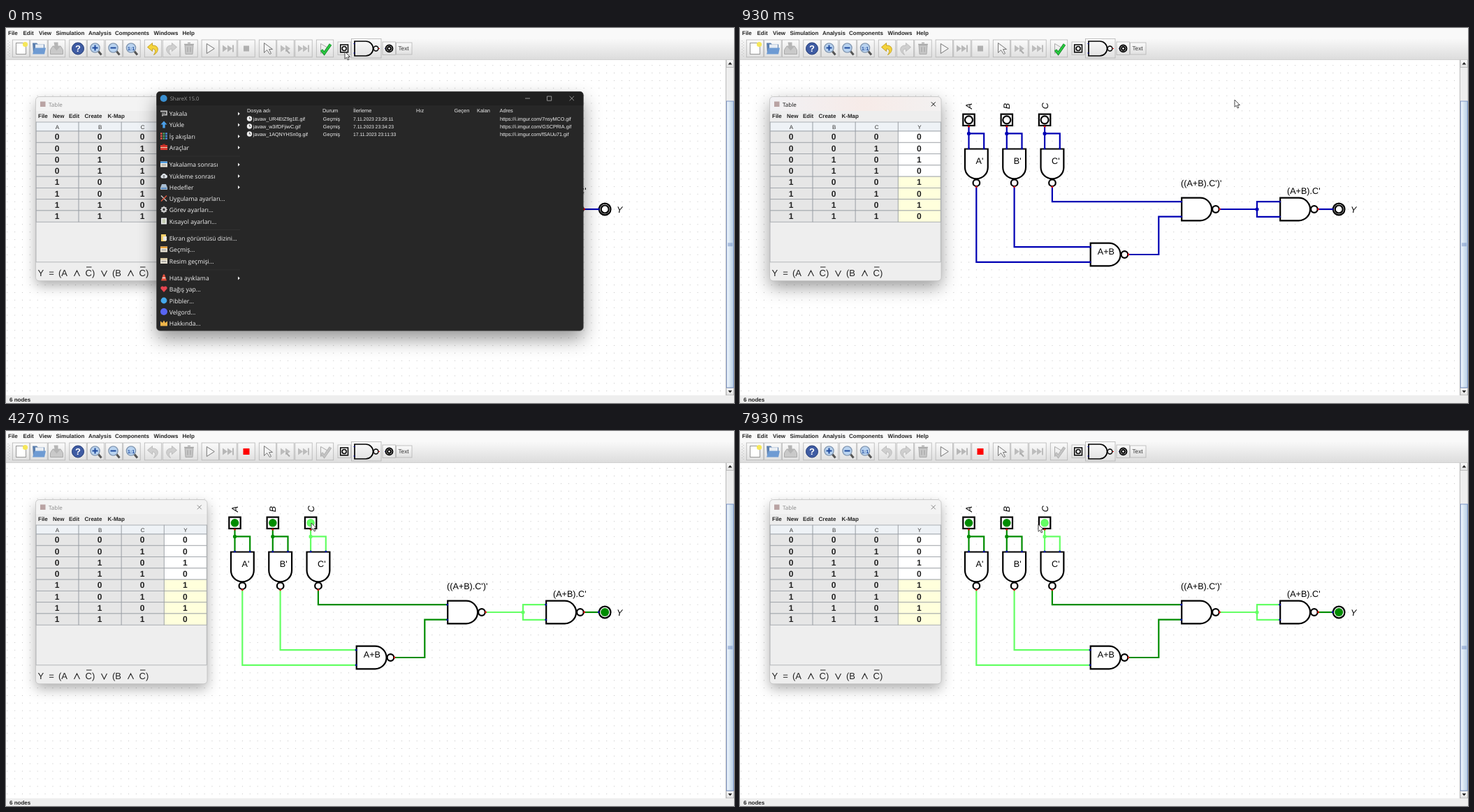
Recreate the animation shown at these times as an HTML page. Size 1042 by 538 pixels, loop 8000 ms.

```html
<!DOCTYPE html>
<html lang="en">
<head>
<meta charset="utf-8">
<title>Logic simulation</title>
<style>
html, body { margin: 0; width: 100%; height: 100%; overflow: hidden; background: #fff; }
svg { display: block; width: 1042px; height: 538px; text-rendering: geometricPrecision; font-family: "Liberation Sans", Arial, sans-serif; }
.ui { font-family: "Open Sans", "Noto Sans", sans-serif; }
.menu { font-size: 8px; font-weight: bold; fill: #222; }
.digit { font-size: 12px; font-weight: bold; text-anchor: middle; fill: #222; }
.head { font-size: 7.4px; fill: #eee; }
.row { font-size: 7.2px; fill: #f2f2f2; }
.date { font-size: 6.8px; fill: #f2f2f2; }
.label { font-size: 12.6px; }
.ink { fill: none; stroke: #000; stroke-width: 2.2; }
.wire { fill: none; stroke: currentColor; stroke-width: 2.2; }
.btn { fill: url(#face); stroke: #b4b4b4; stroke-width: .8; }
.run .idle, svg:not(.run) .live { display: none; }
.table { filter: drop-shadow(0 7px 9px rgba(0,0,0,.32)); }
.focus .table { filter: drop-shadow(0 9px 12px rgba(0,0,0,.4)); }
.caption { fill: #888; stroke: none; }
.focus .caption { fill: #111; }
.cross { stroke: #8a8a8a; fill: none; }
.focus .cross { stroke: #111; }
.bar { fill: #f3f3f3; }
.focus .bar { fill: url(#warm); }
</style>
</head>
<body>
<svg id="stage" viewBox="0 0 1042 538" xmlns="http://www.w3.org/2000/svg"></svg>
<script>
const U = 10.86;
const LOOP = 8000, STEP = 1000 / 15;

const text = (x, y, s, cls, more = '') => `<text x="${x}" y="${y}" class="${cls}" ${more}>${s}</text>`;
const rect = (x, y, w, h, more = '') => `<rect x="${x}" y="${y}" width="${w}" height="${h}" ${more}/>`;
const path = (d, more = '') => `<path d="${d}" ${more}/>`;
const disc = (x, y, r, more = '') => `<circle cx="${x}" cy="${y}" r="${r}" ${more}/>`;
const at = (x, y, s) => `<g transform="translate(${x} ${y})">${s}</g>`;
const words = (list, y, cls) => list.map(([x, s]) => text(x, y, s, cls)).join('');
const stroke = (c, w = 1) => `fill="none" stroke="${c}" stroke-width="${w}"`;
const fill = c => `fill="${c}"`;

const defs = `<defs>
  <linearGradient id="tool" x2="0" y2="1"><stop stop-color="#fafafa"/><stop offset="1" stop-color="#dcdcdc"/></linearGradient>
  <linearGradient id="face" x2="0" y2="1"><stop stop-color="#fbfbfb"/><stop offset="1" stop-color="#e0e0e0"/></linearGradient>
  <linearGradient id="thumb"><stop stop-color="#f2f8fd"/><stop offset="1" stop-color="#b8cfe5"/></linearGradient>
  <linearGradient id="warm"><stop stop-color="#f1f1f4"/><stop offset=".55" stop-color="#f7ebe8"/><stop offset="1" stop-color="#f3f1f1"/></linearGradient>
  <pattern id="dots" x="-3.7" y="4.8" width="${U}" height="${U}" patternUnits="userSpaceOnUse">${rect(4.9, 4.9, 1.1, 1.1, fill('#c8c8c8'))}</pattern>
</defs>`;

// Toolbar
const lens = glyph => path('M3 3L8 9', stroke('#555', 3)) + disc(-1, -1, 6.6, 'fill="#b9d3f0" stroke="#8499b3" stroke-width="1.4"') +
  (glyph ? path(glyph, stroke('#1f4a9c', 2)) : text(-1, 2, '1:1', '', 'font-size="7" font-weight="bold" text-anchor="middle" fill="#1f4a9c"'));
const turn = (c, edge) => path('M-8-2L-1-8V-4.5C9-5 9 5 1 9C5 3 3 .5-1 .5V4Z', `fill="${c}" stroke="${edge}" stroke-width=".8"`);
const tri = x => `M${x}-5L${x + 7} 0L${x} 5Z`;
const skip = c => path(tri(-8) + tri(-1) + 'M6-5H8V5H6Z', fill(c));
const pointer = path('M-5-8V6L-1 2L3 8L5 7L2 1H7Z', 'fill="#f4f4f4" stroke="#777"');
const tick = (c, edge) => path('M-6-7L6 0L-6 7Z', stroke('#aaa')) + path('M-5 2L-1 7L8-6', stroke(edge, 4)) + path('M-5 2L-1 7L8-6', stroke(c, 2.5));
const tools = [
  [21.5, rect(-7, -8, 14, 16, 'fill="#fff" stroke="#999"') + disc(6, -6, 3.6, fill('#f6e75a'))],
  [47, path('M-8 7L-9-8H-3L-1-6H8V7Z', fill('#5c7fae')) + rect(-5, -6, 12, 7, fill('#e8edf3')) + path('M-9 8L-6-1H10L8 8Z', fill('#6e9bd3'))],
  [72.5, path('M-9 2L-6-3H6L9 2V8H-9Z', 'fill="#c9c9c9" stroke="#aaa"') + path('M-4-9H2V-4H6L0 3L-6-4H-3Z', fill('#b5b5b5'))],
  [103, disc(0, 0, 8.5, 'fill="#3f5ca3" stroke="#223b78"') + text(0, 4.7, '?', '', 'font-size="13" font-weight="bold" text-anchor="middle" fill="#fff"')],
  [128.5, lens('M-5-1H3M-1-5V3')],
  [154.5, lens('M-5-1H3')],
  [180, lens('')],
  [210.5, `<g class="idle">${turn('#f4d33c', '#b99410')}</g><g class="live">${turn('#cfcfcf', '#b5b5b5')}</g>`],
  [236.5, `<g transform="scale(-1 1)">${turn('#cfcfcf', '#b5b5b5')}</g>`],
  [262, path('M-6-5H6L5 8H-5Z', 'fill="#c6c6c6" stroke="#aaa"') + path('M-7-6H7M-2-8H2M-2-2V5M2-2V5', stroke('#aaa', 1.3))],
  [292.3, path('M-5-7L6 0L-5 7Z', 'fill="#f4f4f4" stroke="#777"')],
  [318, skip('#b8b8b8')],
  [344, rect(-4, -4, 8, 8, 'class="idle" fill="#b0b0b0"') + rect(-4.5, -4.5, 9, 9, 'class="live" fill="#f00"')],
  [374.5, pointer],
  [400, path(tri(-7) + tri(0), fill('#bdbdbd')) + path('M1 2L6 7', stroke('#aaa', 2))],
  [426, skip('#bdbdbd')],
  [456.5, `<g class="idle">${tick('#28c840', '#128022')}</g><g class="live">${tick('#c4c4c4', '#adadad')}</g>`]
];
const ring = disc(0, 0, 5.6, 'class="ink"') + disc(0, 0, 2.7, 'class="ink" stroke-width="1.3"');
const parts = rect(475, 20, 18.5, 18.5, 'class="btn"') + rect(494.5, 15.5, 42.5, 27.5, 'class="btn"') +
  rect(539, 20, 18.5, 18.5, 'class="btn"') + rect(558.5, 21, 22.5, 17, 'class="btn"') +
  rect(478.7, 24, 10.8, 10.8, 'class="ink" style="stroke-width:1.5"') + disc(484.1, 29.4, 3, 'class="ink" style="stroke-width:1.5"') +
  path('M499 19H515A10.3 10.3 0 0 1 515 40H499Z', 'class="ink" style="stroke-width:1.7"') + disc(529.5, 29.5, 3.4, 'class="ink" style="stroke-width:1.5"') +
  path('M497.5 22.5h2M497.5 36h2M542 29.4h2', stroke('#00a')) + path('M533 29.5h2', stroke('#c00')) +
  at(548.5, 29.4, `<g transform="scale(.88)">${ring}</g>`) + text(561.5, 32.2, 'Text', '', 'font-size="8.2" fill="#333"');
const bumps = Array.from({ length: 12 }, (_, i) => rect(2.5 + i % 2 * 2, 18 + i * 2, 1, 1, fill('#bbb'))).join('');
const topMenu = [[3, 'File'], [24.5, 'Edit'], [47, 'View'], [71.5, 'Simulation'], [118, 'Analysis'], [156, 'Components'], [211.5, 'Windows'], [252.5, 'Help']];
const chrome = rect(0, 0, 1042, 14, fill('#f9f9f9')) + rect(0, 14, 1042, 31.5, fill('url(#tool)')) + rect(0, 45, 1042, .8, fill('#ccc')) +
  words(topMenu, 10, 'menu') + bumps +
  tools.map(([x, icon]) => rect(x - 12.2, 17, 24.4, 24.8, 'class="btn"') + at(x, 29.5, icon)).join('') + parts +
  rect(0, 527, 1042, 11, fill('#eee')) + text(5, 536, '6 nodes', 'menu');
const scroll = rect(1030.5, 45.5, 11.5, 481.5, 'fill="#eee" stroke="#aaa" stroke-width=".8"') +
  rect(1031, 45.5, 10.5, 11, 'class="btn"') + rect(1031, 516.3, 10.5, 10.5, 'class="btn"') +
  path('M1033.5 52.5L1036.4 49L1039.3 52.5ZM1033.5 520L1036.4 523.5L1039.3 520Z', fill('#222')) +
  rect(1031.3, 105, 10, 411, 'fill="url(#thumb)" stroke="#6382bf" stroke-width=".8"') +
  path('M1033 309h7M1033 310.7h7M1033 312.4h7', stroke('#6382bf', .7));

// Circuit
const inputX = [327.5, 381.8, 436.1];
const nets = {
  S: 'M555.8 325H599.3V270.7H632', N: 'M686 260H740M773 249.1H740V270.9H773', Y: 'M827 260H848',
  a: 'M338.3 227V335.8H501.5', b: 'M392.6 227V314.1H501.5', c: 'M446.9 227V249.1H632'
};
const joints = { N: disc(740, 260, 2.6, fill('currentColor')) };
inputX.forEach((x, i) => {
  const k = 'ABC'[i];
  nets[k] = `M${x} 140V173M${x} 151.4h21.7V173`;
  joints[k] = disc(x, 151.4, 2.6, fill('currentColor')) + disc(x, 131.8, 5.8, 'class="live" fill="currentColor"');
});
joints.Y = disc(857.2, 260, 6, 'class="live" fill="currentColor"');
const wires = Object.keys(nets).map(k => `<g id="net${k}">${path(nets[k], 'class="wire"')}${joints[k] || ''}</g>`).join('');
const gate = (x, y, turned = 0) => `<g transform="translate(${x} ${y}) rotate(${turned})">` +
  path('M0-16.4H26.5A16.4 16.4 0 0 1 26.5 16.4H0Z', 'class="ink" style="fill:#fff"') + disc(48.7, 0, 4.8, 'class="ink" style="fill:#fff"') +
  disc(-.6, -U, 1.4, fill('#00a')) + disc(-.6, U, 1.4, fill('#00a')) + disc(54.4, 0, 1.4, fill('#d00')) + '</g>';
const inputs = inputX.map((x, i) => {
  const k = 'ABC'[i];
  return rect(x - 8.2, 123.6, 16.4, 16.4, 'class="ink"') + disc(x, 131.8, 5.5, 'class="ink idle"') + disc(x, 141.3, 1.4, fill('#d00')) +
    text(0, 0, k, 'label', `font-style="italic" transform="translate(${x + 4.5} 116.3) rotate(-90)"`) +
    gate(x + U, 173.5, 90) + text(x + 10, 194.5, k + "'", 'label');
}).join('');
const circuit = rect(0, 46, 1030, 481, fill('#fff')) + rect(0, 46, 1030, 481, fill('url(#dots)')) + wires + inputs +
  gate(501.7, 325) + gate(632.2, 260) + gate(773.2, 260) +
  disc(857.2, 260, 8.3, 'class="ink"') + disc(857.2, 260, 5.5, 'class="ink idle"') + disc(848.2, 260, 1.4, fill('#00a')) +
  text(511.8, 325.3, 'A+B', 'label') + text(631, 227.3, "((A+B).C')'", 'label') + text(783, 238.3, "(A+B).C'", 'label') +
  text(874, 265, 'Y', 'label', 'font-style="italic"');

// Truth table
const colX = i => 43 + i * 61.1, rowY = i => 148 + i * 16.28;
let cells = '';
for (let r = 0; r < 8; r++) {
  const a = r >> 2, b = r >> 1 & 1, c = r & 1;
  [a, b, c, (a | b) & (1 - c)].forEach((v, i) => {
    const shade = i < 3 ? '#e6e6e6' : r < 4 ? '#fff' : '#ffffdc';
    cells += rect(colX(i), rowY(r), 61.1, 16.28, `fill="${shade}" stroke="#9a9fa5" stroke-width=".8"`) + text(colX(i) + 30, rowY(r) + 12.3, v, 'digit');
  });
}
const heads = ['A', 'B', 'C', 'Y'].map((s, i) => rect(colX(i), 135, 61.1, 13, 'fill="#eef2f6" stroke="#9a9fa5" stroke-width=".8"') +
  text(colX(i) + 30.5, 144.7, s, '', 'font-size="8" text-anchor="middle" fill="#333"')).join('');
const table = rect(42.5, 98.5, 245.5, 264.3, 'rx="5" fill="#eee" class="table"') + path('M42.5 119V103.5Q42.5 98.5 47.5 98.5H283Q288 98.5 288 103.5V119Z', 'class="bar"') +
  rect(49, 105.5, 7.5, 7.5, fill('#b9a3a3')) + text(61, 112.7, 'Table', 'ui caption', 'font-size="8"') +
  path('M273.8 106.3l6 6m0-6l-6 6', 'class="cross"') +
  words([[46, 'File'], [67, 'New'], [90, 'Edit'], [112.5, 'Create'], [145.5, 'K-Map']], 129.3, 'menu') + heads + cells +
  path('M43 134.5V335.8H287.3V134.5', stroke('#a5a9ad', .8)) +
  `<g font-size="13" fill="#222">${words([[45.5, 'Y'], [61.3, '='], [75, '(A'], [113.5, 'C)'], [152, '(B'], [190.5, 'C)']], 356, '')}</g>` +
  path('M97.5 356l4-8l4 8M136.5 348l4 8l4-8M174.5 356l4-8l4 8M115 343h7.5M192 343h7.5', stroke('#222', 1.1)) +
  rect(42.5, 98.5, 245.5, 264.3, 'rx="5" fill="none" stroke="#bbb" stroke-width=".7"');

// Uploader window
const sheet = c => rect(1, .5, 8, 9, fill('#eee')) + path('M2.5 3h5M2.5 5h5M2.5 7h5', stroke(c, 1));
const card = c => rect(0, 1, 10, 8, fill('#ece6d8')) + rect(0, 1, 10, 2.5, fill(c)) + path('M1.5 6h7', stroke('#888', 1.2));
const cloud = 'M2 8.5A2.4 2.4 0 0 1 2 4A3.2 3.2 0 0 1 8 3.6A2.5 2.5 0 0 1 8 8.5Z';
const grid = [0, 1, 2].map(i => path(`M${i * 3.6} 1.5h2.6m-2.6 3.5h2.6m-2.6 3.5h2.6`, stroke(['#e2574c', '#4aa564', '#4f8fe0'][i], 2.4))).join('');
const items = [
  [123, 'Yakala', 1, path('M0 2H9V7H3V9', stroke('#b9b9b9', 1.8)) + rect(2, 4, 5, 3, fill('#777'))],
  [139, 'Yükle', 1, path('M5 0L9.5 5H6.7V10H3.3V5H.5Z', fill('#4b9fe8'))],
  [155.5, 'İş akışları', 1, grid],
  [171.5, 'Araçlar', 1, rect(0, 2, 10, 7, fill('#d8382e')) + rect(3, .5, 4, 2, fill('#a8261f')) + rect(0, 5, 10, 1, fill('#f0d0b0'))],
  [196, 'Yakalama sonrası', 1, card('#4f9be0')],
  [212.5, 'Yükleme sonrası', 1, path(cloud, fill('#dfe5ea')) + path('M5 8V4.5M3.5 6L5 4.5L6.5 6', stroke('#555', 1))],
  [228.5, 'Hedefler', 1, path('M2 1H8L10 6V9H0V6Z', fill('#a9bdd0')) + rect(1, 6, 8, 2, fill('#5d8cc0'))],
  [245, 'Uygulama ayarları...', 0, path('M1 1L9 9', stroke('#c3c3c3', 1.6)) + path('M9 1L1 9', stroke('#d8553d', 1.6))],
  [261, 'Görev ayarları...', 0, disc(5, 5, 3, stroke('#d0d0d0', 2)) + path('M5 0v10M0 5h10M1.5 1.5l7 7M8.5 1.5l-7 7', stroke('#d0d0d0', 1)) + disc(5, 5, 1.4, fill('#272727'))],
  [277.5, 'Kısayol ayarları...', 0, sheet('#98a878')],
  [301.5, 'Ekran görüntüsü dizini...', 0, path('M1 0H8V10H1Z', fill('#f2cf6a')) + rect(4, 3, 5, 6, fill('#e8e8e8'))],
  [318, 'Geçmiş...', 0, card('#e8a13c')],
  [334.5, 'Resim geçmişi...', 0, card('#d6c7a0')],
  [359, 'Hata ayıklama', 1, path('M4 0H6L9 9H1Z', fill('#e2503c')) + path('M2.8 5h4.4', stroke('#f5e8e0', 1.4))],
  [375, 'Bağış yap...', 0, path('M5 9.5L.5 4.5A2.6 2.6 0 0 1 5 2A2.6 2.6 0 0 1 9.5 4.5Z', fill('#e64550'))],
  [391.5, 'Pibbler...', 0, disc(5, 5, 4.4, fill('#45a8ea'))],
  [407.5, 'Velgord...', 0, disc(5, 5, 5, fill('#5865f2'))],
  [424, 'Hakkında...', 0, path('M0 2L3 4.5L5 1L7 4.5L10 2V9H0Z', fill('#efb54a'))]
];
const side = items.map(([y, s, more, icon]) => at(221, y - 5.5, icon) + text(233.8, y + 3, s, 'ui', 'font-size="8.65" fill="#f2f2f2"') +
  (more ? path(`M332 ${y - 2.6}l2.8 2.6l-2.8 2.6Z`, fill('#eee')) : '')).join('');
const uploads = [
  ['javaw_UR4EtZ9g1E.gif', '7.11.2023 23:29:11', '7nsyMCO'],
  ['javaw_w3ifDFjiwC.gif', '7.11.2023 23:34:23', 'GSCPRIA'],
  ['javaw_1AQNYHSn0g.gif', '17.11.2023 23:11:33', 'fSAUu71']
].map(([file, date, id], i) => {
  const y = 132.6 + i * 11;
  return disc(348.5, y - 2.6, 3.7, fill('#eee')) + path(`M348.5 ${y - 4.8}v2.3h2`, stroke('#444', .9)) + text(353.8, y, file, 'row') +
    text(453.8, y, 'Geçmiş', 'row') + text(497, y, date, 'date') + text(707, y, `https://i.imgur.com/${id}.gif`, 'row');
}).join('');
const columns = [[345, 'Dosya adı'], [453, 'Durum'], [497, 'İlerleme'], [587, 'Hız'], [641.5, 'Geçen'], [674, 'Kalan'], [706.5, 'Adres']];
const uploader = `<g id="uploader">` +
  rect(215.5, 91.3, 610.8, 343, 'rx="5" fill="#272727" style="filter:drop-shadow(0 12px 13px rgba(0,0,0,.42))"') +
  path('M215.5 111V96.3Q215.5 91.3 220.5 91.3H821.3Q826.3 91.3 826.3 96.3V111Z', fill('#202020')) +
  disc(225.7, 101, 5, fill('#3a8fd0')) + text(234.7, 104, 'ShareX 15.0', 'ui', 'font-size="7.6" fill="#9a9a9a"') +
  path('M743 101h7M774.5 98h6.2v6.2h-6.2ZM806.6 97.8l6.4 6.4m0-6.4l-6.4 6.4', stroke('#a0a0a0', .9)) +
  path('M221 184h114M221 289.5h114M221 347h114', stroke('#343434', .8)) +
  side + words(columns, 120.8, 'head') + uploads +
  rect(215.5, 91.3, 610.8, 343, 'rx="5" fill="none" stroke="#444" stroke-width=".6"') + '</g>';

const arrow = path('M0 0V10.3L2.4 8.1L4.2 12L5.9 11.2L4.2 7.5H7.4Z', 'id="cursor" fill="#fff" stroke="#222" stroke-width=".8"');

const stage = document.getElementById('stage');
stage.innerHTML = defs + circuit + scroll + chrome + table + uploader + arrow;
const find = id => document.getElementById(id);
const cursor = find('cursor'), win = find('uploader');

// time, x, y
const track = [
  [0, 485, 34], [733, 737, 100], [800, 744, 100], [867, 735, 101], [933, 708, 103], [1267, 296, 28], [1400, 295, 31],
  [1733, 327, 104], [1933, 331, 131.5], [2733, 331, 131.5], [2933, 382, 132], [3600, 382, 132], [3867, 437, 132],
  [4733, 437, 132], [5133, 329, 132], [5267, 330, 133], [5533, 387, 135], [5600, 387, 135], [5733, 384, 134],
  [5800, 384, 134], [6333, 379, 130.5], [6600, 379, 130.5], [6867, 326, 132], [7000, 327, 133], [7400, 440, 137],
  [7733, 436, 133], [7800, 436, 133], [7933, 427, 134]
];
const highs = { A: [[2067, 2733], [5200, 6933]], B: [[3200, 3600], [6067, 6600]], C: [[4133, 4733], [7867, 9000]] };

function place(t) {
  const i = track.findIndex(p => p[0] > t);
  if (i < 0) return track[track.length - 1].slice(1);
  const [t0, x0, y0] = track[i - 1], [t1, x1, y1] = track[i];
  const k = (t - t0) / (t1 - t0), e = k * k * (3 - 2 * k);
  return [x0 + (x1 - x0) * e, y0 + (y1 - y0) * e];
}

function draw(t) {
  const run = t >= 1333;
  stage.classList.toggle('run', run);
  stage.classList.toggle('focus', t >= 867 && !run);

  const v = {};
  for (const k in highs) {
    v[k] = highs[k].some(([on, off]) => t >= on && t < off);
    v[k.toLowerCase()] = !v[k];
  }
  v.S = !(v.a && v.b);
  v.N = !(v.S && v.c);
  v.Y = !v.N;
  for (const k in nets) find('net' + k).style.color = !run ? '#0000b4' : v[k] ? '#64ff64' : '#008c00';

  const gone = Math.min(1, Math.max(0, (t - 755) / 170));
  win.style.display = gone < 1 ? '' : 'none';
  win.setAttribute('opacity', 1 - gone);
  win.setAttribute('transform', `translate(521 ${263 + 12 * gone}) scale(${1 - .12 * gone}) translate(-521 -263)`);
  cursor.setAttribute('transform', `translate(${place(t)})`);
}

const start = performance.now();
function tick15() {
  const t = (performance.now() - start) % LOOP;
  draw(Math.round(Math.floor((t + 4) / STEP) * STEP));
  requestAnimationFrame(tick15);
}
tick15();
</script>
</body>
</html>
```
